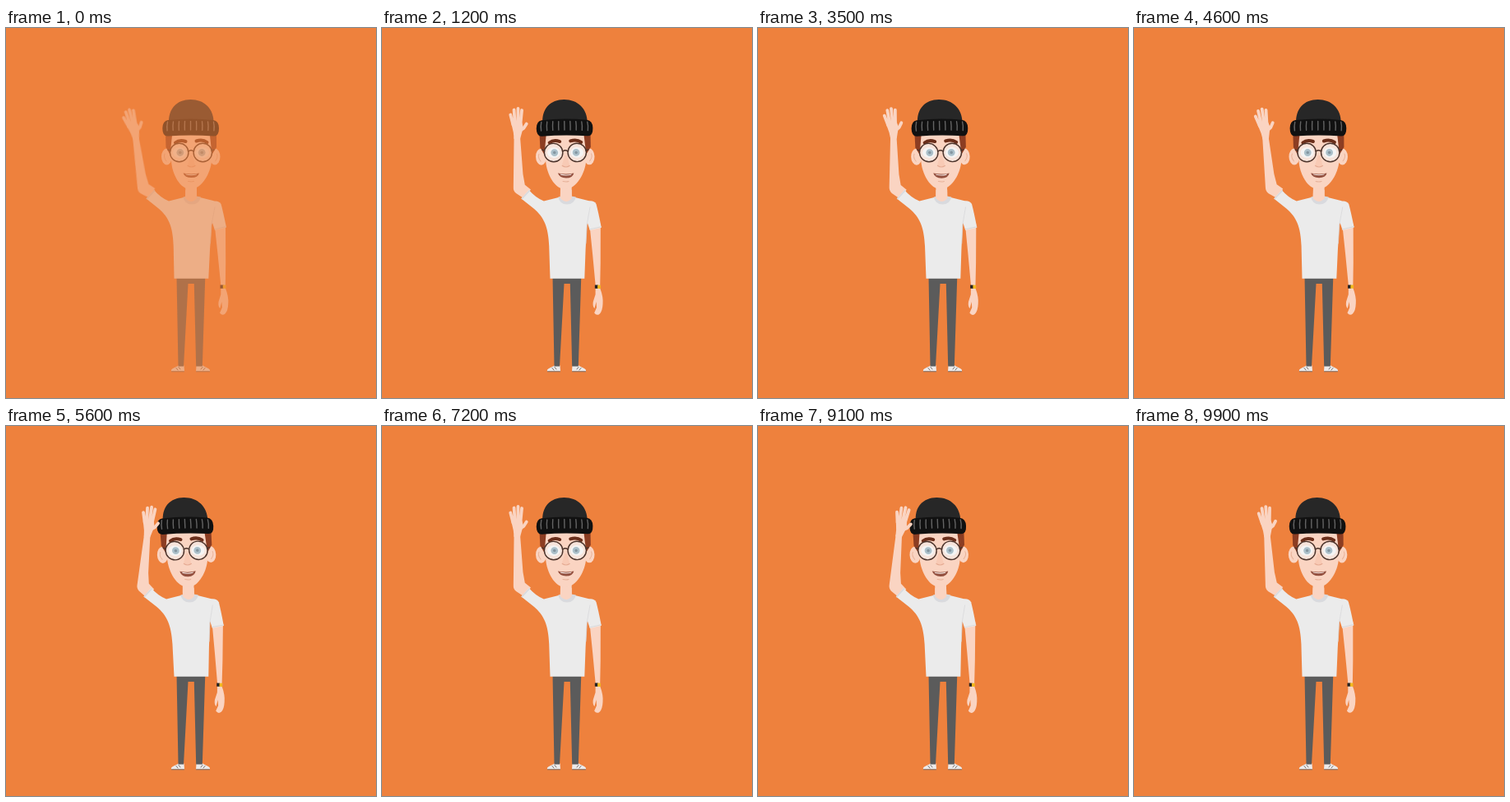
Animation of 450x450 px, one loop 10 s. Source, as an HTML page:

```html
<!DOCTYPE html>
<html lang="en">
<head>
<meta charset="utf-8">
<title>Waving man</title>
<style>
  html, body { margin: 0; width: 100%; height: 100%; overflow: hidden; background: #ee813d; }
  svg { display: block; width: 100%; height: 100%; }
  .skin { fill: #fad4c2; }
  .line { fill: none; stroke-linecap: round; stroke-linejoin: round; }
</style>
</head>
<body>
<svg viewBox="0 0 450 450">
  <rect width="450" height="450" fill="#ee813d"/>
  <g id="man">
    <g id="shoes">
      <path d="M201 417.5C200 414 206 413 209.500 410.500H216.500L217 417.500Z" fill="#eceaea"/>
      <path d="M248 417.500C249 414 243 413 239.500 410.500H231.500L231 417.500Z" fill="#eceaea"/>
      <path class="line" d="M201.500 417.800H216.500M231.500 417.800H247.500M207 413.500L209 416M210 412.500L212 415M242 413.500L240 416M239 412.500L237 415" stroke="#6c6664" stroke-width=".9"/>
    </g>
    <path d="M207.500 302H242.300L238.800 411.500H231.200L228.800 311H221.500L216 411.500H209.500Z" fill="#5b5b5b"/>

    <g id="upper">
      <path class="skin" d="M218.500 186H232V206H218Z"/>
      <g id="head">
        <ellipse class="skin" cx="195.500" cy="156.500" rx="6.500" ry="10"/>
        <ellipse class="skin" cx="254" cy="156.500" rx="6.500" ry="10"/>
        <path class="line" d="M193 153Q191 157 195 162M256.500 153Q258.500 157 254.500 162" stroke="#e9b39a" stroke-width="1"/>
        <path d="M194 128H256V145L251 153H199L194.500 145Z" fill="#8c3d22"/>
        <path class="skin" d="M202.500 126H247.500L249.500 145L250 162C249 176 238 196 224.500 196S202 177 201 162L200.500 145Z"/>
        <path class="line" d="M206 139.500Q211 135.500 218.500 138M231.500 137.500Q239 135 244.500 139" stroke="#6b2f1b" stroke-width="4"/>
        <g id="eyes">
          <circle cx="210.700" cy="151.500" r="11" fill="#f7e4db"/>
          <circle cx="239.300" cy="151.500" r="11" fill="#f7e4db"/>
          <ellipse cx="211" cy="151.500" rx="8" ry="6.300" fill="#f4f4f4"/>
          <ellipse cx="239" cy="151.500" rx="8" ry="6.300" fill="#f4f4f4"/>
          <circle cx="211.800" cy="151.500" r="4.400" fill="#abc0ca"/>
          <circle cx="238.200" cy="151.500" r="4.400" fill="#abc0ca"/>
          <circle cx="211.800" cy="151.500" r="1.800" fill="#8496a1"/>
          <circle cx="238.200" cy="151.500" r="1.800" fill="#8496a1"/>
        </g>
        <g class="line" stroke="#4b332b" stroke-width="1.400">
          <circle cx="210.700" cy="151.500" r="11.200"/>
          <circle cx="239.300" cy="151.500" r="11.200"/>
          <path d="M222 150Q225 147.500 228 150M199.500 149L197 148M250.500 149L253 148"/>
        </g>
        <path d="M224.500 155L220.500 167Q225 170.500 230 167L227 155Z" fill="#f8cab5"/>
        <path class="line" d="M221 167.500Q225.500 170.500 230 167.500" stroke="#e5aa92" stroke-width="1.100"/>
        <g id="mouth">
          <path d="M0 0Q10 2 19.500 0Q18 5.500 10 5.500T0 0Z" fill="#94503f"/>
          <path d="M2.500 1Q10 2.500 17 1L16 2Q10 3.400 3.500 2Z" fill="#f6ece8"/>
        </g>
        <path class="line" d="M221.500 186.500Q225.500 187.500 228.500 186.500" stroke="#e6b199" stroke-width="1"/>
        <path d="M198 116C197 98 208 87 224.500 87S253 98 252.500 116Z" fill="#272727"/>
        <path d="M197 112Q224.500 109 252 112Q259 113 259 122Q259 131.500 253 131.500Q224.500 129.500 197 131.500Q190.300 132 190.300 122Q190.500 113 197 112Z" fill="#111"/>
        <g id="ribs" class="line" stroke="#646464" stroke-width="1.400"></g>
      </g>
    </g>

    <g id="forearm">
      <path class="skin" d="M-6 -5L-3.700 -66H3.700L6 -20L8 -7L15 -1L7 10L-3 3Q-6.500 0 -6 -5Z"/>
      <g id="hand">
        <path class="skin" d="M-3.700 2L-4.500 -6L-7 -17L6 -18L7.500 -12L3.700 2Z"/>
        <path class="line" d="M-4.800 -15L-8 -27.500M-2.500 -16L-3.700 -33.500M1 -16L1.200 -35M4 -15L5.800 -33M3.500 -8L8 -11L11.500 -16.500" stroke="#fad4c2" stroke-width="3.800"/>
      </g>
    </g>

    <g id="torso">
      <g id="arm">
        <path class="skin" d="M253.500 238L267 238L267.200 285L266.800 316Q271 327 270.300 335Q270 344 266.500 347.500Q263 350.500 260 346.500L262.800 340L262.300 333L260.300 341Q257.800 339 258.500 333L261.300 324V313L257.500 275Z"/>
        <path d="M260.500 312.500H264.500V316.800H260.500Z" fill="#252222"/>
        <path d="M263.800 312.500H267.500V316.800H263.800Z" fill="#f2b91e"/>
        <path d="M247 212Q258 208 261.500 214Q264 223 268 242.500L254 246L248 228Z" fill="#ebebeb"/>
        <path class="line" d="M254.200 244.800L267.600 241.500" stroke="#d9d9db" stroke-width="1"/>
      </g>
      <path d="M180 197Q188 206.500 198 210.500L216 206Q226 214 236 206L252 210Q259 212 259 221L250 239L248 270L246.300 304.800H204.500L203.700 265C203 242 198 230 185.500 219.500L170.500 207.500Z" fill="#ebebeb"/>
      <path class="line" d="M180.500 198L171.500 207.500" stroke="#d8dade" stroke-width="1.700"/>
      <path class="line" d="M254 218L250 239L248.500 262" stroke="#d9d9db" stroke-width=".8"/>
      <path d="M215.500 205.500Q226 203 237 205.500Q235 214.500 226 214.500T215.500 205.500Z" fill="#d9dade"/>
      <path class="skin" d="M218.400 197H232V207Q225.500 215 218 207Z"/>
    </g>
  </g>
</svg>
<script>
  const LOOP = 10000, STEP = 100, WAVES = 15, FOREARM = 65;
  const part = id => document.getElementById(id);
  const move = (id, transform) => part(id).setAttribute('transform', transform);

  for (let i = 0; i < 9; i++) {
    const offset = i - 4, x = 224.5 + offset * 7;
    const rib = document.createElementNS('http://www.w3.org/2000/svg', 'path');
    const y = 113.5 + offset * offset * 0.05;
    rib.setAttribute('d', `M${x} ${y}Q${x + offset * 0.3} ${y + 5} ${x + offset * 0.1} ${y + 10.5}`);
    part('ribs').append(rib);
  }

  function render(time) {
    const t = Math.floor(time % LOOP / STEP) * STEP;
    const phase = t * WAVES / LOOP;
    // -1 is the far left of the wave, 1 the far right
    const wave = lag => -Math.cos((phase - lag) * 2 * Math.PI);
    const sway = (1 + wave(0)) / 2;
    const lean = `translate(0 305) skewX(${2 * sway}) translate(0 -305)`;

    const elbow = 166.5 - 1.5 * sway;
    const wrist = 165.8 + 8 * wave(0.02);
    const armAngle = Math.asin((wrist - elbow) / FOREARM) * 180 / Math.PI;
    const handAngle = -1 + 15 * wave(0.06);

    part('man').setAttribute('opacity', Math.min(1, 0.42 + t / 250));
    move('upper', lean);
    move('torso', lean);
    move('head', `rotate(${-0.9 * sway} 225 190)`);
    move('arm', `rotate(${3 * sway} 258 218)`);
    move('forearm', `translate(${elbow} 198) rotate(${armAngle})`);
    move('hand', `translate(0 ${-FOREARM}) rotate(${handAngle - armAngle})`);
    move('mouth', `translate(215.500 176.500) scale(1 ${1 + 0.25 * sway})`);
  }

  let start;
  function tick(now) {
    start ??= now;
    render(now - start);
    requestAnimationFrame(tick);
  }
  render(0);
  requestAnimationFrame(tick);
</script>
</body>
</html>
```
